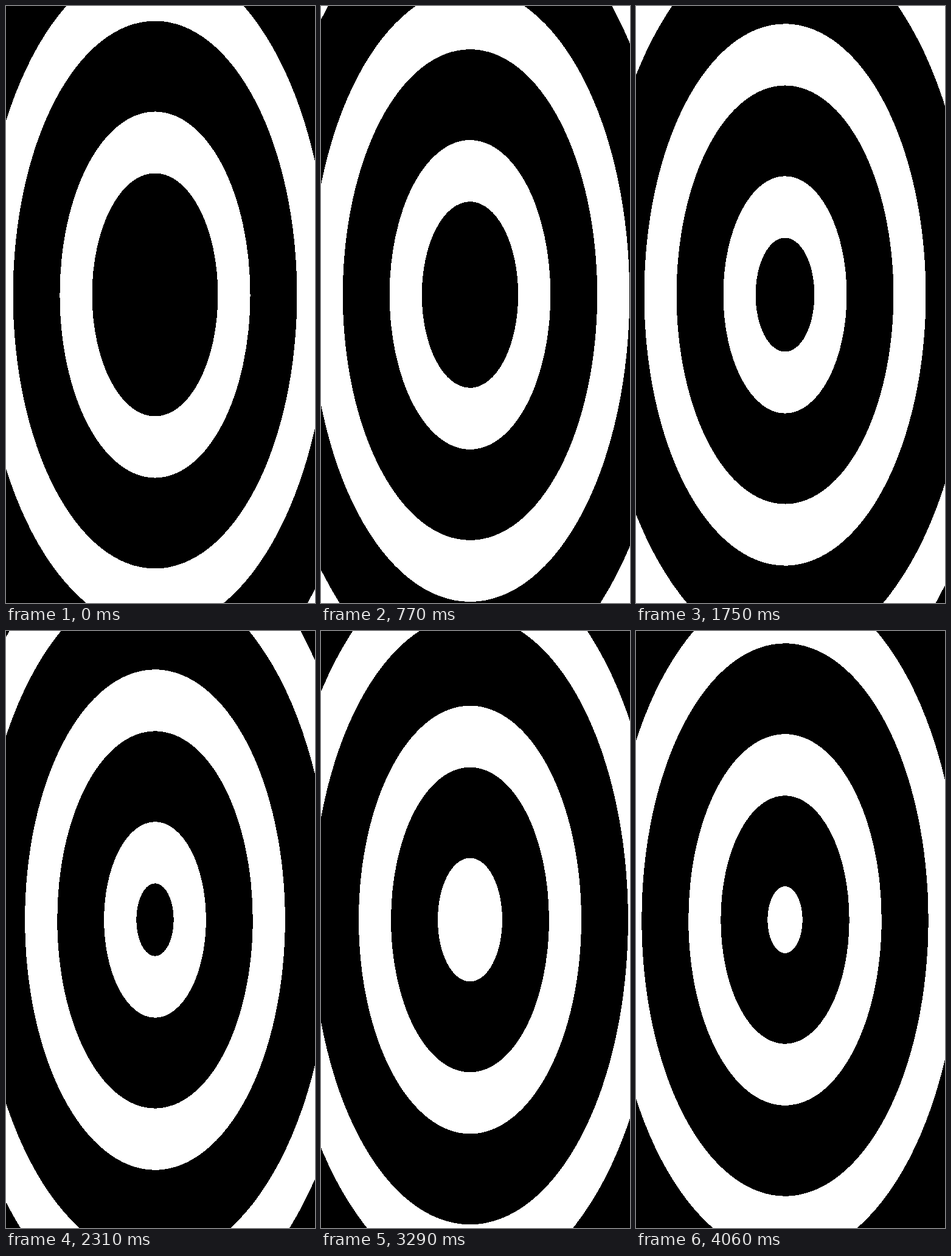
An HTML page that plays this animation: 508x980 px, repeating every 4130 ms.

```html
<!DOCTYPE html>
<html lang="en">
<head>
<meta charset="utf-8">
<title>Shrinking rings</title>
<style>
  html, body { margin: 0; width: 100%; height: 100%; overflow: hidden; background: #000; }
  svg { display: block; width: 100%; height: 100%; }
</style>
</head>
<body>
<svg viewBox="0 0 508 980" preserveAspectRatio="none" shape-rendering="crispEdges"></svg>
<script>
const LOOP = 4130, STEP = 70;
const CENTER = { x: 245, y: 474 };
const ASPECT = 0.52;
const PERIOD = 250;              // one black band plus one white band
const BLACK = 200, WHITE = 300;  // starting radii of the innermost pair
const PAIRS = 3;
const SPREAD = 0.55;             // white bleeds into every partly covered pixel

const svg = document.querySelector("svg");

function addDisc(radius, fill, spread) {
  const el = document.createElementNS("http://www.w3.org/2000/svg", "ellipse");
  el.setAttribute("cx", CENTER.x);
  el.setAttribute("cy", CENTER.y);
  el.setAttribute("fill", fill);
  svg.append(el);
  return { el, radius, spread };
}

// Largest first, so that smaller discs cover the larger ones.
const discs = [];
for (let i = PAIRS - 1; i >= 0; i--) {
  discs.push(addDisc(WHITE + i * PERIOD, "#fff", SPREAD));
  discs.push(addDisc(BLACK + i * PERIOD, "#000", -SPREAD));
}

function draw(time) {
  const stepped = Math.floor((time % LOOP) / STEP) * STEP;
  const shrink = PERIOD * stepped / LOOP;
  for (const { el, radius, spread } of discs) {
    const r = Math.max(0, radius - shrink);
    el.setAttribute("rx", Math.max(0, r * ASPECT + spread));
    el.setAttribute("ry", Math.max(0, r + spread));
  }
}

const start = performance.now();
function tick() {
  draw(performance.now() - start);
  requestAnimationFrame(tick);
}
tick();
</script>
</body>
</html>
```
